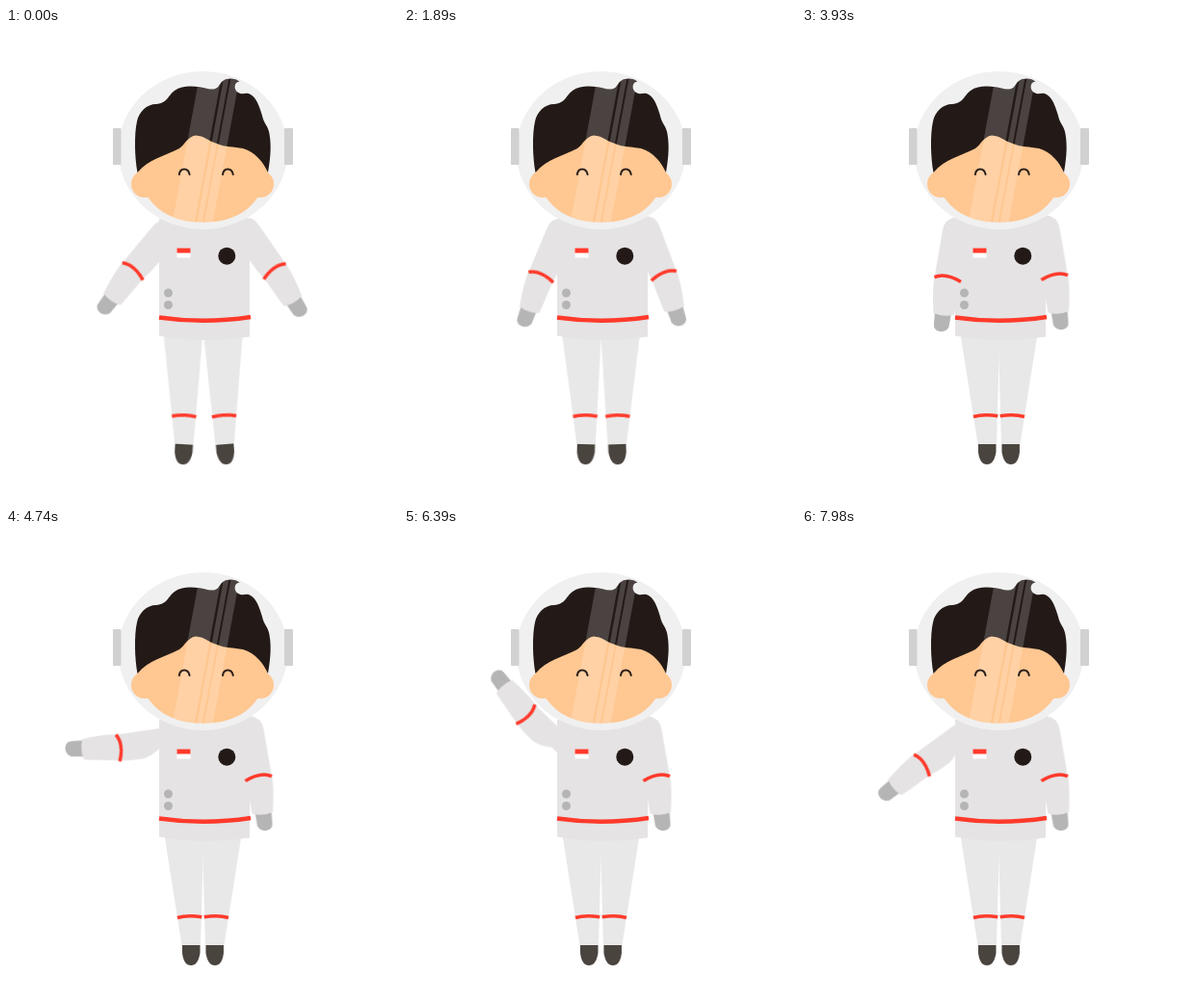
An HTML page for the animation above (8000 ms loop, 407x491 px).

```html
<!DOCTYPE html>
<html lang="en">
<head>
<meta charset="utf-8">
<title>Waving astronaut</title>
<style>
  html, body { margin: 0; width: 100%; height: 100%; overflow: hidden; background: #fff; }
  svg { display: block; width: 100%; height: 100%; }

  .suit { fill: #e5e3e4; }
  .pants { fill: #e8e8e8; }
  .glove, .button { fill: #b5b5b5; }
  .boot { fill: #4a443f; }
  .port { fill: #d1d1d1; }
  .helmet { fill: #f0f0f0; }
  .hair { fill: #231a17; }
  .skin { fill: #ffc791; }
  .band { fill: none; stroke: #ff3a2b; stroke-width: 3.6; }
  .belt { stroke-width: 4.4; }
  .eye { fill: none; stroke: #2a201c; stroke-width: 2; stroke-linecap: round; }
  .shine { fill: #fff; fill-opacity: .18; }

  .limb { animation: 8s ease-in-out infinite both; }
  .arm { transform-origin: 157px 220px; }
  .forearm { transform-origin: 151px 259px; }
  .leg { transform-origin: 186px 300px; }
  .arm.left { animation-name: wave; }
  .forearm.left { animation-name: bend; }
  .arm.right { --out: 25deg; animation-name: spread; }
  .leg.left { --out: 3.2deg; animation-name: spread; }
  .leg.right { --out: 4.5deg; animation-name: spread; }

  @keyframes spread {
    0%, 33.75% { transform: rotate(var(--out)); }
    3.75%, 15%, 37.5%, 100% { transform: rotate(0deg); }
  }
  @keyframes wave {
    0%, 33.75% { transform: rotate(30deg); }
    3.75%, 15%, 37.5%, 49.125% { transform: rotate(0deg); }
    67.875%, 78.875% { transform: rotate(126deg); }
    73.375%, 84.375% { transform: rotate(96deg); }
    89.875% { transform: rotate(128deg); animation-timing-function: cubic-bezier(.5, 0, .75, .62); }
    100% { transform: rotate(41deg); }
  }
  @keyframes bend {
    0%, 49.125%, 73.375%, 84.375%, 100% { transform: rotate(0deg); }
    67.875% { transform: rotate(16deg); }
    78.875% { transform: rotate(12deg); }
  }
</style>
</head>
<body>
<svg viewBox="0 0 407 491" aria-label="Waving astronaut">
  <defs>
    <g id="forearm">
      <path class="glove" d="M138 294 L155 296 L152.500 310.500 Q149 316 143 315 Q136 313.500 137 307 Z"/>
      <path class="suit" d="M164.500 262 L158 297.500 Q147 300.500 136.500 296 C135.500 277 136 268 137.500 257 Q151 246 164.500 262 Z"/>
    </g>
    <g id="upper">
      <path class="suit" d="M164.500 219 C168 226 170 232 170 239 Q168.500 250 164.500 263 L137.500 259 L146 210 Q148 198 160 196 L168 200 Z"/>
      <path class="band" d="M137.500 258.700 Q149 253.800 165 263.500"/>
    </g>
    <g id="leg">
      <path class="boot" d="M183 431 H201.500 V440 Q199.500 453 192 453 Q184.500 453 183 440 Z"/>
      <path class="pants" d="M164.500 318 L182.500 432 H202 L205 325 V318 Z"/>
      <path class="band" d="M178 403.500 Q188 400.600 203.300 402.700"/>
    </g>
    <clipPath id="head">
      <use href="#hair"/>
      <use href="#face"/>
    </clipPath>
  </defs>

  <g class="limb leg left"><use href="#leg"/></g>
  <g transform="translate(409 0) scale(-1 1)">
    <g class="limb leg right"><use href="#leg"/></g>
  </g>

  <path class="suit" d="M159 198 H253 V320.500 Q206 328 159 319.500 Z"/>
  <path class="band belt" d="M159 300.500 Q206 307.300 254 300"/>
  <circle class="button" cx="168.500" cy="275" r="4.500"/>
  <circle class="button" cx="168.500" cy="287.500" r="4.500"/>
  <rect x="177.500" y="228.500" width="14" height="10" fill="#fff"/>
  <rect x="177.500" y="228.500" width="14" height="5" fill="#ff3a2b"/>
  <circle class="hair" cx="229.300" cy="236.700" r="9"/>

  <g class="limb arm left">
    <g class="limb forearm left"><use href="#forearm"/></g>
    <use href="#upper"/>
  </g>
  <g transform="translate(413.500 -2) scale(-1 1)">
    <g class="limb arm right">
      <use href="#forearm"/>
      <use href="#upper"/>
    </g>
  </g>

  <ellipse class="helmet" cx="204.500" cy="127" rx="88" ry="82"/>
  <rect class="port" x="111" y="104" width="8.500" height="38" rx="1"/>
  <rect class="port" x="289" y="104" width="9" height="38" rx="1"/>

  <circle class="skin" cx="144" cy="162" r="14"/>
  <circle class="skin" cx="264" cy="162" r="14"/>
  <path id="face" class="skin" d="M136 146 C142 184 169 201.800 204 201.800 C241 201.800 267 184 272 146 L250 115 L197 105 L160 125 Z"/>
  <path id="hair" class="hair" d="M136.500 150 C133.500 134 133 110 136 97 C138 87 146 79 156 79 C168 78 168 70 175 65 C185 58 200 61 209 63 C224 66 219 56 229 53 Q237 51 242.500 55.500 C236.500 56 236 64 241 67 C246 70 249 66.500 253 68.500 C260 72 263 81 266 91 C267.500 99 272.500 102 273.500 110 C276 124 274 138 272 150 C267 139 259 129 246 125 C236 123 228 124 219 120 C209 117 206 112 197 111.500 C188 113 186 121 180 125 C165 133 148 136 136.500 150 Z"/>

  <g clip-path="url(#head)">
    <g class="shine" transform="translate(0 60) skewX(-10.500)">
      <rect x="199" y="-10" width="23" height="155"/>
      <rect x="224.500" y="-10" width="5.500" height="155"/>
      <rect x="232" y="-10" width="9" height="155"/>
    </g>
  </g>

  <path class="eye" d="M179.800 152 C181 144.800 189 144.800 190.600 152"/>
  <path class="eye" d="M225 152 C226.200 144.800 234.200 144.800 235.800 152"/>
</svg>
</body>
</html>
```
